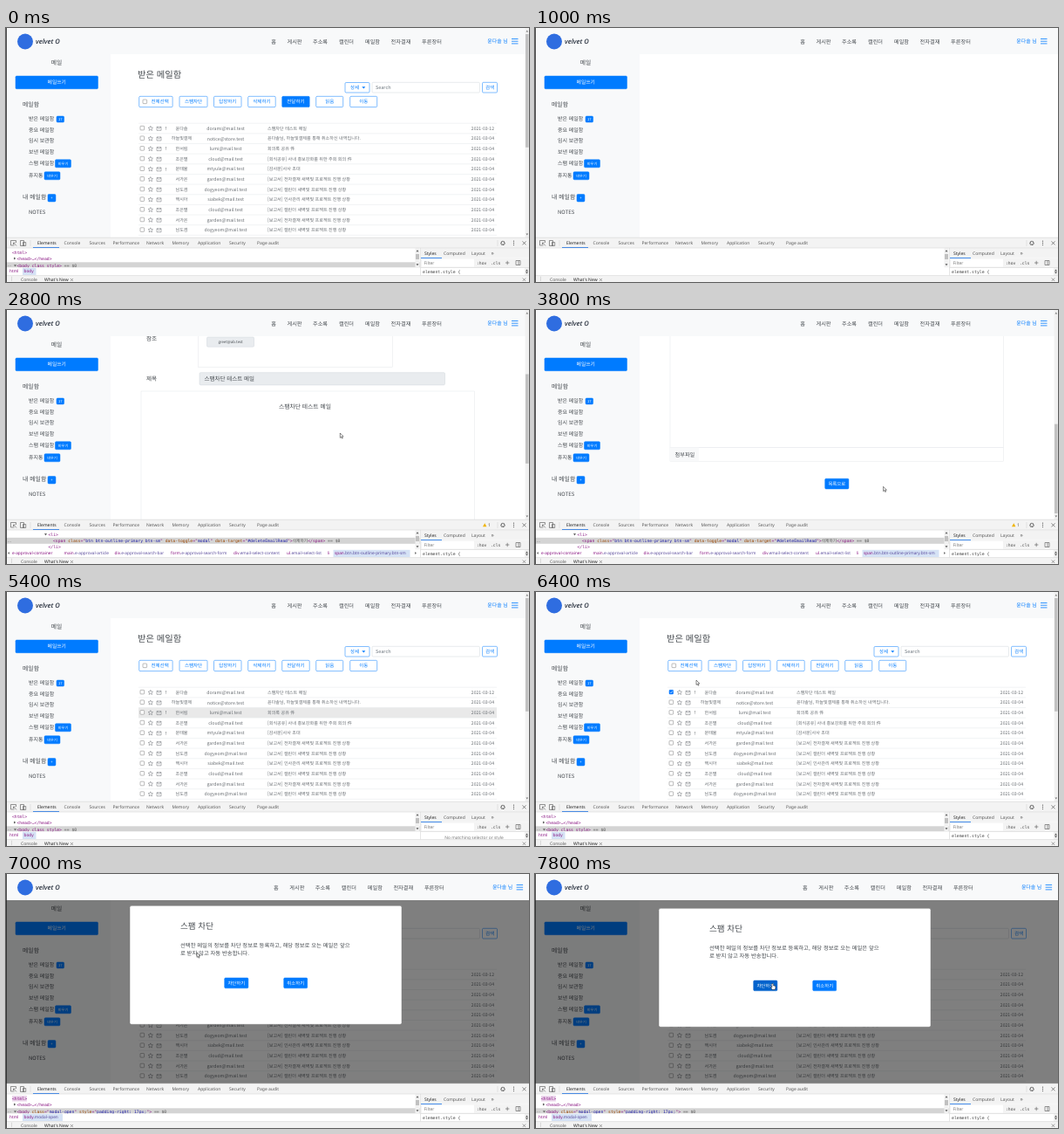
These frames come from a looping animation (600x291 px, 8 s). An HTML page:

```html
<!DOCTYPE html>
<html lang="ko">
<head>
<meta charset="utf-8">
<title>메일함</title>
<style>
html, body { margin: 0; width: 100%; height: 100%; overflow: hidden; background: #fff; }
svg { display: block; width: 100vw; height: 100vh; }
text { font-family: "Noto Sans CJK KR", "Noto Sans CJK", sans-serif; white-space: pre; text-rendering: geometricPrecision; }
.ui { font-family: "Noto Sans", "Open Sans", sans-serif; }
.mono { font-family: "DejaVu Sans Mono", "Noto Sans Mono", monospace; }
.brand { font-family: "Open Sans", sans-serif; font-style: italic; font-weight: 600; }
.strong { font-weight: 500; }
</style>
</head>
<body>
<svg id="stage" viewBox="0 0 600 291"></svg>
<script>
const BLUE = '#007bff', DARK = '#0062cc', INK = '#454a4f', SOFT = '#686d72', PALE = '#f8f9fa';
const LINE = '#e3e6e9', FIELD = '#e9ecef', EDGE = '#ced4da', TAG = '#881280';
const USER = '윤다솔', USER_MAIL = 'dorami@mail.test';

const esc = s => s.replace(/&/g, '&amp;').replace(/</g, '&lt;').replace(/>/g, '&gt;');
const rect = (x, y, w, h, fill, stroke = 'none', r = 0) =>
  `<rect x="${x}" y="${y}" width="${w}" height="${h}" rx="${r}" fill="${fill}" stroke="${stroke}" stroke-width=".5"/>`;
const path = (d, stroke, width = .5, fill = 'none') =>
  `<path d="${d}" fill="${fill}" stroke="${stroke}" stroke-width="${width}"/>`;
const move = (x, y, body) => `<g transform="translate(${x} ${y})">${body}</g>`;

// y is the optical middle of the line
function text(x, y, s, size, fill = INK, anchor = 'start', cls = '') {
  return `<text x="${x}" y="${y + size * .36}" font-size="${size}" fill="${fill}" text-anchor="${anchor}" class="${cls}">${esc(s)}</text>`;
}
const mid = (x, y, s, size, fill, cls) => text(x, y, s, size, fill, 'middle', cls);
const ui = (x, y, s, fill = '#5a5a5a', size = 5) => text(x, y, s, size, fill, 'start', 'ui');

function button(x, y, w, h, label, fill = 'none', size = 5.5) {
  const solid = fill !== 'none';
  return rect(x, y, w, h, fill, solid ? fill : BLUE, 1.2) +
    mid(x + w / 2, y + h / 2, label, size, solid ? '#fff' : BLUE);
}

function checkbox(x, y, on) {
  return rect(x, y, 4.6, 4.6, on ? '#0075ff' : '#fff', on ? '#0075ff' : '#767676', .7) +
    (on ? path(`M${x + 1} ${y + 2.4}l1 1.1 1.8-2.3`, '#fff', .7) : '');
}

// the menu is centred, so it moves half as far as the right-hand items
function header(gain) {
  const nav = [[307, '홈'], [331, '게시판'], [360.5, '주소록'], [390.5, '캘린더'], [420.5, '메일함'], [453, '전자결재'], [488.5, '푸른장터']];
  return rect(0, 0, 600, 30, PALE) +
    `<circle cx="22" cy="15.5" r="9" fill="#2f6de0"/>` +
    text(34, 15.5, 'velvet O', 7.6, '#2b3340', 'start', 'brand') +
    move(gain / 2, 0, nav.map(([x, s]) => mid(x, 15.3, s, 6.2)).join('')) +
    move(gain, 0, mid(564, 15.3, USER + ' 님', 5.9, BLUE, 'strong') +
      path('M580 12.5h7.5M580 15.2h7.5M580 17.9h7.5', BLUE, .8));
}

function sidebar() {
  const items = [[104, '받은 메일함'], [116.7, '중요 메일함'], [129.3, '임시 보관함'], [142, '보낸 메일함'], [155, '스팸 메일함'], [169, '휴지통'], [211, 'NOTES']];
  const badges = [[58, 101, 8.6, 7, '17'], [56.5, 150.8, 18, 9, '비우기'], [44, 164.8, 18, 9, '비우기'], [48, 190.5, 9, 8.5, '+']];
  return rect(0, 30, 120, 210, PALE) + mid(58, 39.3, '메일', 6.8) +
    button(11, 55, 94.5, 14.7, '메일쓰기', BLUE, 5.8) +
    text(19, 88, '메일함', 6.9) + text(19, 194, '내 메일함', 6.9) +
    items.map(([y, s]) => text(26, y, s, 6)).join('') +
    badges.map(([x, y, w, h, s]) => button(x, y, w, h, s, BLUE, 4.2)).join('');
}

const PEOPLE = {
  user: [USER, USER_MAIL], pay: ['하늘빛결제', 'notice@store.test'], han: ['한서림', 'lumi@mail.test'],
  cho: ['조은별', 'cloud@mail.test'], moon: ['문태율', 'mtyule@mail.test'], seo: ['서가온', 'garden@mail.test'],
  nam: ['남도겸', 'dogyeom@mail.test'], baek: ['백시아', 'siabek@mail.test']
};
const report = s => `[보고서] ${s} 새벽빛 프로젝트 진행 상황`;
const MAILS = [
  ['user', '스팸차단 테스트 메일'], ['pay', USER + '님, 하늘빛결제를 통해 취소하신 내역입니다.'],
  ['han', '회의록 공유 件'], ['cho', '[회식공유] 사내 홍보강화를 위한 주회 회의 件'],
  ['moon', '[감사문]사사 초대'], ['seo', report('전자결재')], ['nam', report('캘린더')],
  ['baek', report('인사관리')], ['cho', report('캘린더')], ['seo', report('전자결재')], ['nam', report('캘린더')],
  ['baek', report('인사관리')]
];

function mailRow([who, subject], i, s) {
  const y = 115 + i * 11.65, [name, mail] = PEOPLE[who];
  const star = 'M165.8 -2.7l.8 1.7 1.9.2-1.4 1.3.4 1.9-1.7-1-1.7 1 .4-1.9-1.4-1.3 1.9-.2z';
  return move(0, y,
    rect(152, -5.8, 411, 11.6, s.row === i ? '#e9e9e9' : '#fff') +
    path('M152 -5.8h411', LINE) + checkbox(154, -2.7, i === 0 && s.checked) +
    path(star, SOFT) + path('M173 -1.7h5v4h-5zl2.5 2 2.5-2', SOFT) +
    (i < 5 && i % 2 === 0 ? mid(183.3, 0, '!', 5.3) : '') +
    mid(201.5, 0, name, 5.1, SOFT) + mid(252, 0, mail, 5.2, SOFT) + text(300, 0, subject, 5.1, SOFT) +
    text(560, 0, i ? '2021-03-04' : '2021-03-12', 5.1, SOFT, 'end'));
}

function listPage(s) {
  const actions = [[152.7, 38.4, ''], [199, 32, '스팸차단'], [238.5, 31.5, '답장하기'], [277.7, 31.5, '삭제하기'], [316.7, 31.5, '전달하기'], [355.7, 31, '읽음'], [394.7, 31, '이동']];
  return text(151, 53, '받은 메일함', 10.3) +
    button(389, 62.5, 28, 11.5, '') + text(395, 68.2, '상세', 5.5, BLUE) + path('M408.3 67.3h4l-2 2.2z', 'none', 0, BLUE) +
    rect(420, 62.3, 123.5, 11.7, '#fff', EDGE, 1.2) + text(424, 68.2, 'Search', 5.5, '#6c757d') +
    button(546.5, 62.3, 17, 11.7, '검색') +
    actions.map(([x, w, label], i) => button(x, 78.3, w, 12.3, label, s.btn === i ? BLUE : 'none')).join('') +
    checkbox(157, 82, false) + text(166.5, 84.5, '전체선택', 5.5, BLUE) +
    MAILS.map((m, i) => mailRow(m, i, s)).join('');
}

function mailPage(s) {
  const labels = [[115, '보내는 사람'], [165, '받는 사람'], [189, '참조'], [235, '제목']];
  const field = (x, y, w, h) => rect(x, y, w, h, FIELD, EDGE, 1.3);
  return move(0, -s.scroll,
    text(151, 53, '메일함', 10.4) +
    ['스팸차단', '답장하기', '삭제하기', '전달하기'].map((b, i) => button(159.3 + i * 39, 76, 31.3, 12.2, b)).join('') +
    labels.map(([y, t]) => text(161, y, t, 6.6)).join('') +
    field(220, 107.8, 64, 14.2) + text(225.5, 115, USER, 6.3) +
    field(291.5, 107.8, 212, 14.2) + text(297, 115, USER_MAIL, 6.5) +
    rect(220.5, 128.5, 223, 39, '#fff', LINE) + field(230.5, 133.3, 54, 11.2) + mid(257.5, 138.8, USER_MAIL, 4.3) +
    rect(220.5, 183, 223, 38.5, '#fff', LINE) + field(230.5, 187, 54, 11.2) + mid(257.5, 192.7, 'greet@ab.test', 4.3) +
    field(222, 227.7, 281.5, 14.2) + text(227.5, 235, '스팸차단 테스트 메일', 6.5) +
    rect(155, 249, 382.5, 198.5, '#fff', LINE) + mid(343, 266.3, '스팸차단 테스트 메일', 6.8) +
    rect(155, 447.5, 382.5, 15.7, '#fff', LINE) + rect(155, 447.5, 33, 15.7, PALE) + text(160.5, 455.8, '첨부파일', 6.2) +
    button(332.7, 483.2, 27.2, 11.8, '목록으로', s.back ? DARK : BLUE, 5.4));
}

function scrollbar(s) {
  const total = s.page === 'mail' ? 530 : 418, k = 226 / total;
  return rect(595.6, 0, 4.4, 240, '#f1f1f1') + rect(596, 7 + s.scroll * k, 3.6, 240 * k, '#c1c1c1') +
    path('M596.5 4.5l1.3-2 1.3 2zM596.5 235.5l1.3 2 1.3-2z', 'none', 0, '#777');
}

function modal(s) {
  const lines = ['선택한 메일의 정보를 차단 정보로 등록하고, 해당 정보로 오는 메일은 앞으', '로 받지 않고 자동 반송합니다.'];
  return rect(0, 30, 600, 210, `rgba(0,0,0,${s.dim})`) + (s.dialog === null ? '' : move(0, s.dialog,
    rect(142, 39.3, 312, 136, '#fff', '#777', 2) + text(200, 63, '스팸 차단', 9.6) +
    lines.map((t, i) => text(200, 84.3 + i * 9.6, t, 6.35)).join('') +
    button(250.7, 122, 27.2, 11.8, '차단하기', s.ok ? DARK : BLUE, 5.4) +
    button(318.7, 122, 27, 11.8, '취소하기', BLUE, 5.4)));
}

function code(x, y, s) {
  const paint = (c, t) => `<tspan fill="${c}">${t}</tspan>`;
  const body = esc(s).replace(/([\w-]+)="([^"]*)"|(== \$0|[가-힣]+)/g, (m, name, value, plain) =>
    plain ? paint('#555', plain) : paint('#994500', name) + '="' + paint('#1a1aa6', value) + '"');
  return `<text x="${x}" y="${y + 1.7}" font-size="4.75" fill="${TAG}" class="mono">${body}</text>`;
}

function tree(s) {
  const arrow = (x, y, open) => path(open ? `M${x} ${y - 1}h3l-1.5 2.4z` : `M${x} ${y - 1.5}l2.4 1.5-2.4 1.5z`, 'none', 0, '#666');
  const crumb = (x, t) => {
    const [name, ...rest] = t.split('.');
    return `<text x="${x}" y="279.9" font-size="4.75" fill="${TAG}" class="ui">${name}<tspan fill="#5a4a9c">${rest.map(r => '.' + r).join('')}</tspan></text>`;
  };
  if (s.tree === 'none') return '';
  if (s.tree === 'span') {
    const crumbs = [[7, 'e-approval-container'], [66.5, 'main.e-approval-article'], [124.5, 'div.e-approval-search-bar'], [189, 'form.e-approval-search-form'],
      [261, 'div.email-select-content'], [322, 'ul.email-select-list'], [369, 'li'], [377, 'span.btn.btn-outline-primary.btn-sm']];
    return rect(0, 260.8, 475, 7, '#d4d4d4') + arrow(44, 257, true) + code(48.5, 257, '<li>') + ui(2, 264.2, '…', '#777') +
      code(54, 264.3, '<span class="btn btn-outline-primary btn-sm" data-toggle="modal" data-target="#deleteEmailRead">삭제하기</span> == $0') +
      code(48.5, 271, '</li>') + rect(0, 274.5, 475, 9, '#fff') + rect(375.5, 274.8, 88, 8.2, '#d5e2f5') +
      path('M4 277l-2 1.5 2 1.5z', 'none', 0, '#777') + path('M469 277l2 1.5-2 1.5z', 'none', 0, '#777') +
      crumbs.map(c => crumb(...c)).join('');
  }
  const open = s.tree === 'modal';
  return rect(0, 268.3, 475, 6.3, '#d4d4d4') + (open ? rect(7, 254, 17, 6.5, '#ead3ea') : '') +
    code(7, 257.3, '<html>') + arrow(9, 264, false) + code(12.5, 264, '<head>…</head>') +
    ui(2, 271.2, '…', '#777') + arrow(9, 272.2, true) +
    code(12.5, 272.2, open ? '<body class="modal-open" style="padding-right: 17px;"> == $0' : '<body class style> == $0') +
    rect(0, 274.5, 475, 9, '#fff') + rect(19, 274.8, open ? 46 : 15.5, 8.2, '#d5e2f5') +
    crumb(4, 'html') + crumb(20.5, open ? 'body.modal-open' : 'body');
}

function paneBar(x, y, h) {
  return rect(x, y, 5, h, '#f1f1f1') +
    path(`M${x + 1} ${y + 4}l1.5-2 1.5 2zM${x + 1} ${y + h - 4}l1.5 2 1.5-2z`, 'none', 0, '#555');
}

function devtools(s) {
  const tabs = [[36, 'Elements'], [66.5, 'Console'], [95.5, 'Sources'], [122.5, 'Performance'], [161, 'Network'], [190.5, 'Memory'], [220, 'Application'], [256, 'Security'], [288, 'Page audit']];
  const warn = s.tree === 'span' ? path('M547 248.3l2.2-4 2.2 4z', 'none', 0, '#f0b400') + ui(553, 246.4, '1') : '';
  return rect(0, 240, 600, 51, '#fff') + rect(0, 240, 600, 12, '#f3f3f3') +
    path('M9.5 249h-4v-5.5h6v2.5M8.5 246l3.5 3.5M8.5 246v2M8.5 246h2M16.5 243.5h4v6h-4zM19.5 245.5h3.2v4h-3.2z', '#666', .7) +
    path('M28 243v7M564 243v7', '#ccc') +
    tabs.map(([x, t], i) => ui(x, 246.4, t, i ? '#5a5a5a' : '#222')).join('') + rect(31, 251, 30, 1, '#1a73e8') + warn +
    `<circle cx="570" cy="246.4" r="2" fill="none" stroke="#555" stroke-width="1.2" stroke-dasharray="1.2 .37"/>` +
    [244.2, 246.4, 248.6].map(y => `<circle cx="582.5" cy="${y}" r=".6" fill="#555"/>`).join('') +
    path('M592.5 244.4l4 4M596.5 244.4l-4 4', '#555', .7) +
    tree(s) + paneBar(469.5, 252.3, 22) + rect(470, 259, 4, 6, '#c1c1c1') +
    rect(476, 252.3, 124, 11.4, '#f3f3f3') + ui(480, 258, 'Styles', '#222') + ui(502, 258, 'Computed') + ui(534, 258, 'Layout') + ui(556.5, 257.8, '»', '#5a5a5a', 6.5) +
    rect(476, 263, 24, .9, '#1a73e8') + rect(476, 263.9, 124, 10.6, '#f3f3f3') + rect(477, 264.7, 60, 8.8, '#fff') +
    ui(479.5, 269, 'Filter', '#777') + text(540, 269, ':hov', 4.7, '#444', 'start', 'mono') + text(556, 269, '.cls', 4.7, '#444', 'start', 'mono') +
    path('M573 269h4.4M575.2 266.8v4.4M585 266.5h5v5h-5zM588 266.5v5', '#555', .6) +
    (s.style === 'none' ? mid(537, 280.8, 'No matching selector or style', 4.9, '#777', 'ui') : text(478, 279, 'element.style {', 4.8, '#444', 'start', 'mono')) +
    paneBar(595, 274.6, 9) + path('M0 240.2h600M0 252h600M475.5 252v31.6M475.5 274.5h124.5', '#ccc') +
    rect(0, 283.6, 600, 7.4, '#f3f3f3') + path('M0 283.6h600', '#ccc') +
    ui(4, 287.5, '⋮') + ui(17, 288.4, 'Console') + ui(44, 288.4, "What's New", '#222') +
    path('M74 287l3 3M77 287l-3 3M592.7 286.5l3.5 3.5M596.2 286.5l-3.5 3.5', '#666', .6);
}

function cursor([x, y, hand]) {
  const arrow = 'M0 0v5.4l1.2-1.1.9 1.9.9-.4-.9-1.9h1.7z';
  const pointer = 'M0 0q.8-.3 1 .5v2q1.3-.4 1.5.3 1.2-.2 1.2.8l-.2 2.2-.7 1.2h-2.9l-1.6-2.5q0-.8.7-.5l.5.5v-3.7q0-.6.5-.8z';
  return move(x, y, path(hand ? pointer : arrow, '#111', .5, '#fff'));
}

// [start ms, changes from the state before]
const STEPS = [
  [0, { page: 'list', scroll: 0, btn: 4, row: -1, checked: false, tree: 'body', style: 'element', cur: null, back: false, dim: 0, dialog: null, ok: false }],
  [200, { btn: -1 }], [400, { row: 0 }],
  [1000, { page: 'blank', row: -1, tree: 'none' }], [1200, { page: 'mail', tree: 'body' }], [1400, { tree: 'span' }],
  [1600, { cur: [378, 135] }], [1800, { cur: [383.3, 141] }],
  [2200, { scroll: 22 }], [2400, { scroll: 78 }], [2600, { scroll: 134 }], [2800, { scroll: 156 }],
  [3200, { scroll: 190 }], [3400, { scroll: 250 }], [3600, { scroll: 290 }],
  [3800, { cur: [399.6, 202.3] }], [4000, { cur: [374, 202] }], [4200, { cur: [350, 199, true], back: true }],
  [4400, { page: 'blank', scroll: 0, cur: null, tree: 'none', back: false }], [4600, { page: 'list' }], [4800, { tree: 'body' }],
  [5400, { row: 2, style: 'none' }], [5600, { row: 1, style: 'element' }], [5800, { row: 0 }],
  [6000, { cur: [156.5, 115] }], [6200, { checked: true }], [6400, { row: -1, cur: [185, 101] }], [6600, { cur: [217, 88, true], btn: 1 }],
  [6800, { dim: .19 }], [7000, { dim: .5, dialog: -3, tree: 'modal', cur: [219, 90] }], [7200, { dialog: 0, cur: [232, 101] }],
  [7400, { cur: [252, 114] }], [7600, { cur: [266, 122, true], ok: true }], [7800, { cur: [272.3, 125.5, true] }]
];
const LOOP = 8000;
const stage = document.getElementById('stage');

function draw(s) {
  const main = s.page === 'list' ? listPage(s) : s.page === 'mail' ? mailPage(s) : '';
  const bar = s.dim || s.page === 'blank' ? '' : scrollbar(s);
  stage.innerHTML = rect(0, 0, 600, 291, '#fff') + main + sidebar() + header(s.dim ? 5.6 : 0) + bar +
    (s.dim ? modal(s) : '') + devtools(s) + rect(0, 0, .8, 291, '#222') + (s.cur ? cursor(s.cur) : '');
}

let shown = -1;
function tick(now) {
  const t = now % LOOP;
  const count = STEPS.filter(([start]) => start <= t).length;
  if (count !== shown) {
    shown = count;
    draw(Object.assign({}, ...STEPS.slice(0, count).map(step => step[1])));
  }
  requestAnimationFrame(() => tick(performance.now() - begin));
}
const begin = performance.now();
tick(0);
</script>
</body>
</html>
```
